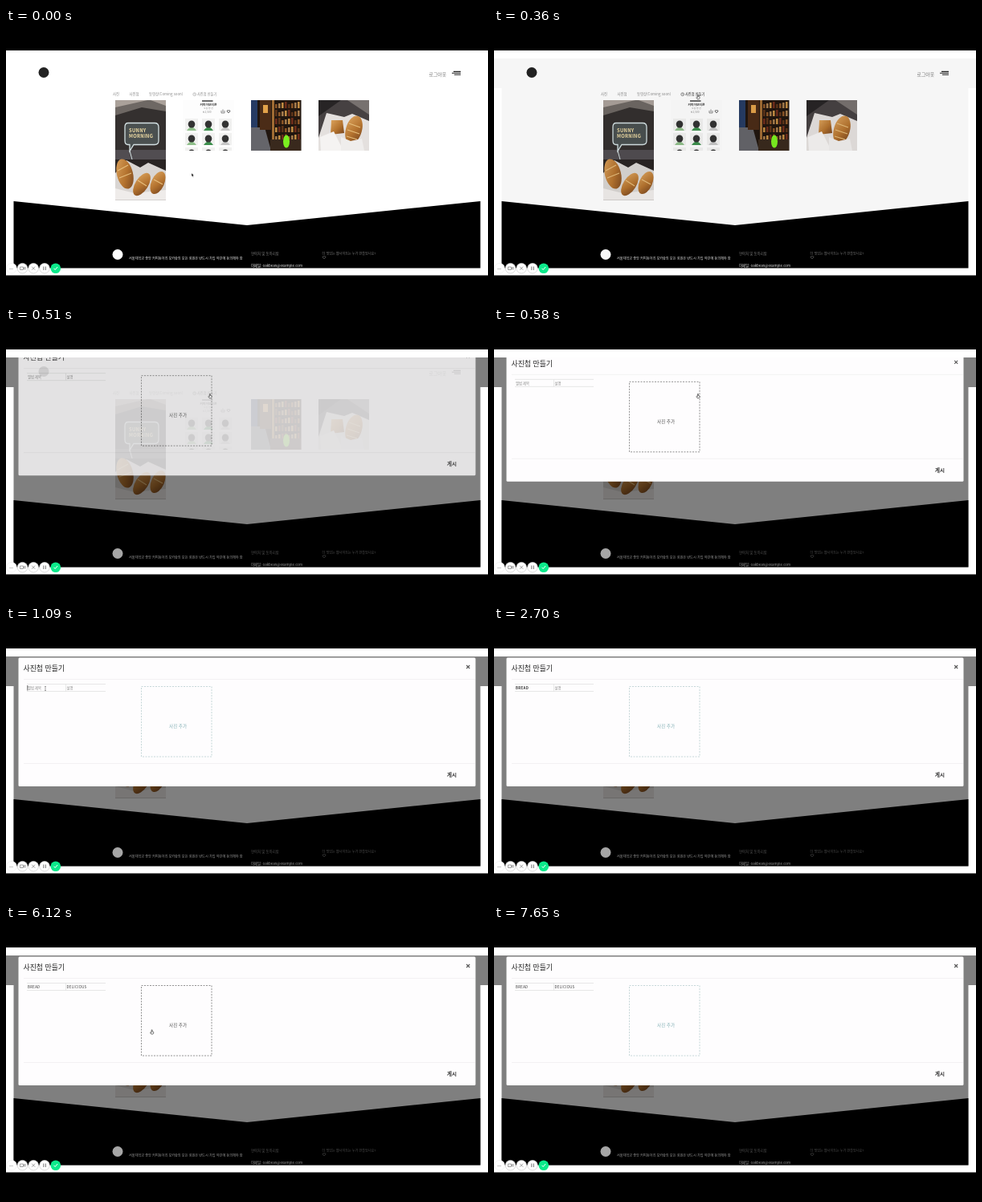
Write an HTML page that moves like this. It is 600 by 338 pixels and loops after 8000 ms.

```html
<!DOCTYPE html>
<html lang="ko">
<head>
<meta charset="utf-8">
<title>사진첩 만들기</title>
<style>
html, body { margin: 0; width: 100%; height: 100%; overflow: hidden; background: #000; }
svg { display: block; width: 100%; height: 100%; }
text { font-family: "Noto Sans CJK KR", "Noto Sans CJK", "Noto Sans", sans-serif; white-space: pre; }
</style>
</head>
<body>
<svg viewBox="0 0 600 338">
  <defs>
    <clipPath id="view"><rect y="38" width="600" height="261"/></clipPath>
    <clipPath id="c1"><rect x="136" y="90" width="63" height="124.5"/></clipPath>
    <clipPath id="c2"><rect x="220" y="90" width="64" height="63"/></clipPath>
    <clipPath id="c3"><rect x="305" y="90" width="62.5" height="63"/></clipPath>
    <clipPath id="c4"><rect x="389" y="90" width="63" height="63"/></clipPath>
    <linearGradient id="crust" x2="1" y2="1">
      <stop stop-color="#dca45e"/><stop offset=".55" stop-color="#b4732f"/><stop offset="1" stop-color="#74421c"/>
    </linearGradient>
  </defs>
  <rect width="600" height="338"/>
  <rect y="28" width="600" height="280.5" fill="#fff"/>

  <circle cx="47" cy="55.5" r="6.5" fill="#222"/>
  <text x="526.5" y="60.3" font-size="5.9" fill="#777">로그아웃</text>
  <path d="M555 56.3h11M557 54.4h9M558 58.3h8" stroke="#222" stroke-width="1.1"/>

  <g font-size="4.4" fill="#888">
    <text x="133" y="84.3">사진</text>
    <text x="153.5" y="84.3">사진첩</text>
    <text x="178" y="84.3">동영상(Coming soon)</text>
    <g id="make">
      <circle cx="234.7" cy="82.7" r="1.9" fill="none" stroke="currentColor" stroke-width=".5"/>
      <path d="M234.7 81.6v1.2h.9" fill="none" stroke="currentColor" stroke-width=".4"/>
      <text x="238" y="84.3" font-size="4.2" fill="currentColor">사진첩 만들기</text>
    </g>
  </g>

  <g clip-path="url(#c1)">
    <rect x="136" y="90" width="63" height="125" fill="#34302f"/>
    <path d="M136 90h63v14l-30-5-33 10z" fill="#6e6864"/>
    <path d="M136 90h40l-40 9zM180 90h19v7z" fill="#aaa19a"/>
    <path d="M136 152h63v12h-63z" fill="#514d51"/>
    <path d="M136 164h63v12l-63 5z" fill="#292423"/>
    <path d="M136 181l14-16 17 9 10-6 22 10v37h-63z" fill="#d9d5d2"/>
    <path d="M136 200l24 6 39-4v13h-63z" fill="#efecea"/>
    <g fill="url(#crust)">
      <ellipse cx="148" cy="182" rx="10" ry="19" transform="rotate(-14 148 182)"/>
      <ellipse cx="169" cy="195" rx="8" ry="16" transform="rotate(32 169 195)"/>
      <ellipse cx="189" cy="193" rx="8" ry="15" transform="rotate(24 189 193)"/>
    </g>
    <path d="M139 178l13-7M141 187l15-6M164 190l11 7M184 189l11 6" stroke="#e6bd7b" stroke-width="1.2"/>
    <path d="M152 118.500h33q5 0 5 5v17q0 5-5 5h-26l-5 8v-8h-2q-4 0-4-5v-17q0-5 4-5z" fill="#4a5050" stroke="#d3e0e2" stroke-width="1.3"/>
    <path d="M154 153l3 11" stroke="#d3e0e2"/>
    <g font-size="5.8" font-weight="700" fill="#f3dfa6" letter-spacing=".3">
      <text x="153" y="129.500">SUNNY</text><text x="153" y="136.500">MORNING</text>
    </g>
  </g>

  <g clip-path="url(#c2)">
    <rect x="220" y="90" width="64" height="63" fill="#fdfdfd"/>
    <path d="M244 91h13.500" stroke="#333" stroke-width="1.4"/>
    <text x="252" y="96.500" font-size="3.800" font-weight="700" text-anchor="middle" fill="#333">커피이모티콘</text>
    <text x="252" y="100.500" font-size="2.800" text-anchor="middle" fill="#888">오늘 한 잔</text>
    <text x="245" y="106" font-size="3.200" fill="#888">₩ 2,500</text>
    <path d="M268 103v3h4v-3M270 105v-3.500" fill="none" stroke="#444" stroke-width=".6"/>
    <path d="M277 106l-2-2q0-2 2-1 2-1 2 1z" fill="none" stroke="#333" stroke-width=".7"/>
    <g id="cards"></g>
  </g>

  <g clip-path="url(#c3)">
    <rect x="305" y="90" width="63" height="63" fill="#21160f"/>
    <path d="M305 90h8v34h-8z" fill="#263c64"/>
    <path d="M305 124h17l8 29h-25z" fill="#65656a"/>
    <path d="M316 90h14v37h-14z" fill="#4b2c17"/>
    <path d="M331 90h3v56h-3z" fill="#a06c34"/>
    <g id="shelves"></g>
    <path d="M320 96h6v10h-6z" fill="#e2a24a"/>
    <path d="M329 139h38v14h-38z" fill="#39291d"/>
    <ellipse cx="349" cy="141.500" rx="4" ry="8" fill="#7bef20"/>
  </g>

  <g clip-path="url(#c4)">
    <rect x="389" y="90" width="63" height="63" fill="#464142"/>
    <path d="M389 90h28l-28 20z" fill="#272425"/>
    <path d="M425 90h27v18z" fill="#77716f"/>
    <path d="M389 137l10-31 22 5 10-4 21 9v37h-63z" fill="#e4e0de"/>
    <path d="M405 115h14l2 16-17 2z" fill="url(#crust)"/>
    <path d="M391 136l17-7 12 24h-28z" fill="#f5f3f2"/>
    <ellipse cx="433" cy="127" rx="10" ry="18" fill="url(#crust)" transform="rotate(16 433 127)"/>
    <path d="M427 119l14 5M425 127l15 5M424 135l13 4" stroke="#e6bd7b" stroke-width="1.2"/>
    <path d="M417 136l12 5 14-3 3 15h-29z" fill="#efedec"/>
  </g>

  <path d="M9.500 216L300 246 590.500 216V299.500H9.500z"/>
  <path id="dim" d="M0 38H600V75H590.500V299.500H9.500V75H0z" opacity="0"/>

  <g id="foot" clip-path="url(#view)" fill="#eee" font-size="4.400">
    <circle cx="139" cy="282.500" r="6.500" fill="#fff"/>
    <text x="153" y="289.300" font-size="4.180">서울대학교 중앙 커피동아리 모카숲의 모든 회원은 반드시 가입 약관에 동의해야 함</text>
    <text x="305" y="282.800" fill="#777">연락처 및 동아리방</text>
    <text x="305" y="298.300">이메일: oakbean@example.com</text>
    <text x="393.500" y="282.800" font-size="4.100" fill="#777">더 멋있는 웹사이트는 누가 만들었나요?</text>
    <path d="M396 288l-2-2q0-2 2-1 2-1 2 1z" fill="none" stroke="#888" stroke-width=".5"/>
  </g>

  <g clip-path="url(#view)">
    <g id="modal">
      <rect x="15.500" y="39.500" width="569" height="160.500" rx="1.500" fill="#fefdfe"/>
      <text x="21.500" y="56.300" font-size="8.900" fill="#222">사진첩 만들기</text>
      <path d="M573.200 49l4 4m0-4l-4 4" stroke="#555" stroke-width="1.100"/>
      <path d="M22 66.500H584M22 171.500H584" stroke="#f0eff0" stroke-width=".8"/>
      <path d="M26 72.500H124M26 81.500H124M74.500 72.500v9" stroke="#dedede" stroke-width=".7"/>
      <g font-size="4.300" fill="#888">
        <text id="hint1" x="27" y="79">앨범 제목</text>
        <text id="hint2" x="75.500" y="79">설명</text>
      </g>
      <g font-size="4.300" fill="#333" letter-spacing=".35">
        <text id="name" x="27" y="78.900"></text>
        <text id="about" x="75.500" y="78.900"></text>
      </g>
      <path id="caret" d="M0 74v6.500" stroke="#222" stroke-width=".7"/>
      <rect id="drop" x="168.500" y="75.500" width="87.500" height="87.500" fill="none" stroke-width=".8" stroke-dasharray="2 1.500"/>
      <text id="add" x="203" y="127.300" font-size="5.600">사진 추가</text>
      <text x="549" y="188.300" font-size="6.500" font-weight="700" fill="#333">게시</text>
    </g>
  </g>

  <g id="tools" fill="#fff" stroke="#ccc" stroke-width=".7">
    <circle cx="7" cy="299.700" r="6.300" stroke="#eee"/>
    <circle cx="20.500" cy="299.700" r="6.300"/>
    <circle cx="34.200" cy="299.700" r="6.300"/>
    <circle cx="48" cy="299.700" r="6.300"/>
    <circle cx="61.800" cy="299.700" r="6.300" fill="#0cea8b" stroke="none"/>
    <g fill="none" stroke="#888" stroke-width=".8">
      <path d="M4 300.500h5" stroke="#bbb"/>
      <path d="M17.500 298h4v3.500h-4zM21.500 299.700l2.500-1.500v3z"/>
      <path d="M32.200 297.700l4 4m0-4l-4 4"/>
      <path d="M46.800 297.500v4.500M49.300 297.500v4.500" stroke="#555"/>
      <path d="M59.500 299.800l1.700 1.700 3-3.500" stroke="#fff" stroke-width="1"/>
    </g>
  </g>

  <g id="mouse">
    <path id="arrow" d="M0-2v4.200l1-.9.800 1.600.6-.3-.7-1.500h1.300z" fill="#111" stroke="#fff" stroke-width=".3"/>
    <path id="hand" d="M-.6-2.500h1v2l1.600.5v1.700l-.7 1h-2.300l-1.200-2 .6-.5 1 .7z" fill="#fff" stroke="#222" stroke-width=".6"/>
    <path id="beam" d="M-1-2.500h2M0-2.500v5M-1 2.500h2" fill="none" stroke="#555" stroke-width=".5"/>
  </g>
</svg>
<script>
const LOOP = 8000;
const $ = id => document.getElementById(id);
const el = {};
document.querySelectorAll('svg [id]').forEach(n => el[n.id] = n);

const clamp = v => Math.max(0, Math.min(1, v));
const span = (t, a, b) => clamp((t - a) / (b - a));
const within = (t, a, b) => t >= a && t < b;
const set = (node, attrs) => { for (const k in attrs) node.setAttribute(k, attrs[k]); };
const show = (node, on) => set(node, { visibility: on ? 'visible' : 'hidden' });

// Emoticon cards: a head and shoulders as plain silhouettes
const shirts = ['#8fbf8a', '#c6c6c6', '#3c8f4c'];
let cards = '';
for (let i = 0; i < 9; i++) {
  const x = 231 + i % 3 * 21, y = 121 + Math.floor(i / 3) * 18;
  cards += `<rect x="${x - 8}" y="${y - 8}" width="16" height="15" fill="#f1f1f0"/>` +
    `<path d="M${x - 6} ${y + 7}q6-9 12 0z" fill="${shirts[(i * 2) % 3]}"/>` +
    `<ellipse cx="${x}" cy="${y - 1}" rx="4.300" ry="4.500" fill="#333"/>`;
}
el.cards.innerHTML = cards;

// Bookshelf lights
const tones = ['#8a5527', '#c18b42', '#5c3419', '#a37a4c', '#6f2e1c'];
let books = '';
for (let r = 0; r < 5; r++) {
  for (let c = 0; c < 8; c++) {
    const h = 5 + (r * 3 + c * 5) % 4;
    books += `<rect x="${335 + c * 4}" y="${100 - h + r * 10}" width="2.600" height="${h}" fill="${tones[(r * 2 + c * 3) % 5]}"/>`;
  }
}
el.shelves.innerHTML = books;

// Time, x, y
const path = [
  [0, 231, 183], [70, 231, 183], [360, 254, 86], [870, 254, 86], [1060, 49, 78],
  [4740, 48, 76], [4850, 48, 76], [5060, 92, 77], [5760, 92, 77],
  [6270, 205, 148], [6410, 186, 137], [6780, 185, 108], [LOOP, 185, 108]
];
function pointer(t) {
  const i = path.findIndex(p => p[0] > t);
  const [a, b] = [path[i - 1], path[i]];
  let k = span(t, a[0], b[0]);
  k = k * k * (3 - 2 * k);
  return [a[1] + (b[1] - a[1]) * k, a[2] + (b[2] - a[2]) * k];
}

const typed = (word, times, t) => word.slice(0, times.filter(v => v <= t).length);
const nameKeys = [1530, 1680, 1900, 2110, 2330];
const aboutKeys = [2990, 3060, 3210, 3350, 3860, 3930, 4010, 4080, 4230];
const caretOff = [[1820, 1890], [2260, 2320], [2700, 2990], [3570, 3860], [4590, 4740]];

function draw(t) {
  const dim = span(t, 350, 500);
  set(el.dim, { opacity: dim * .5 });
  set(el.foot, { opacity: 1 - dim * .35 });

  const fall = 1 - Math.pow(1 - span(t, 440, 740), 2);
  set(el.modal, {
    opacity: span(t, 440, 530),
    transform: `translate(0 ${-25.500 * (1 - fall)})`
  });

  const [x, y] = pointer(t);
  const open = t >= 440;
  const overLink = !open && x > 232 && x < 263 && y < 88;
  const overDrop = within(t, 440, 6820) && x > 168 && x < 257 && y > 75;
  const overField = open && x < 124 && y < 82;
  el.make.setAttribute('color', overLink || open ? '#222' : '#888');
  set(el.drop, { stroke: overDrop ? '#777' : '#b7cdce' });
  set(el.add, { fill: overDrop ? '#555' : '#86b2b7' });

  set(el.mouse, { transform: `translate(${x} ${y})` });
  const seen = t < 1530 || within(t, 4740, 6850);
  const kind = overField ? 'beam' : overLink || overDrop ? 'hand' : 'arrow';
  for (const k of ['arrow', 'hand', 'beam']) show(el[k], seen && k === kind);

  const name = typed('BREAD', nameKeys, t);
  const about = typed('DELICIOUS', aboutKeys, t);
  el.name.textContent = name;
  el.about.textContent = about;
  set(el.name, { 'font-weight': t < 4230 ? 700 : 400 });
  show(el.hint1, !name);
  show(el.hint2, !about);

  const field = t < 2480 ? el.name : el.about;
  const start = t < 2480 ? 26.800 : 75.500;
  const length = field.textContent ? field.getComputedTextLength() : 0;
  set(el.caret, { transform: `translate(${start + length} 0)` });
  show(el.caret, within(t, 1060, 5100) && !caretOff.some(([a, b]) => within(t, a, b)));
}

function tick() {
  draw(performance.now() % LOOP);
  requestAnimationFrame(tick);
}
tick();
</script>
</body>
</html>
```
